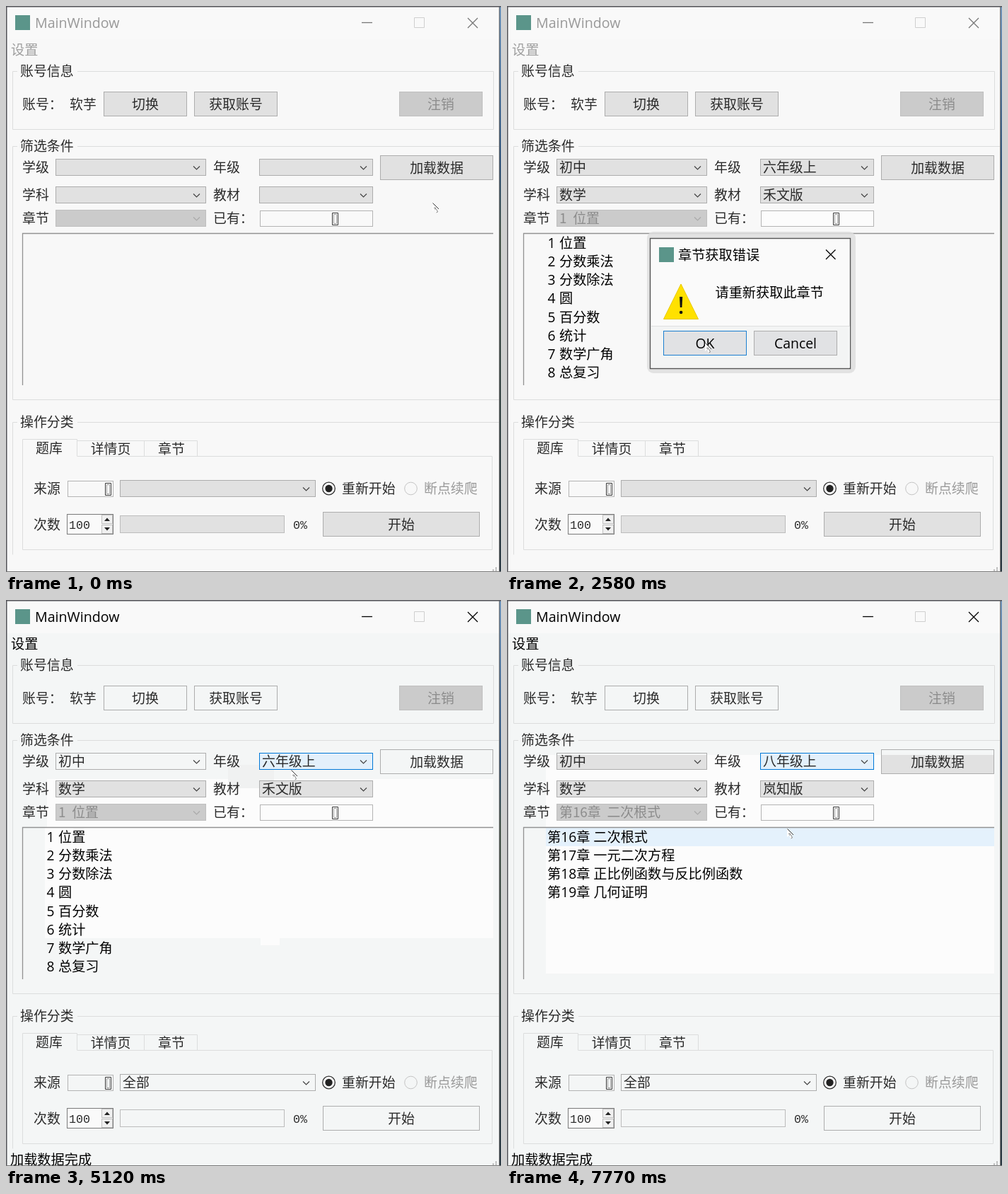
An HTML page for the animation above (8000 ms loop, 700 by 800 pixels).

```html
<!DOCTYPE html>
<html lang="zh-CN">
<head>
<meta charset="utf-8">
<style>
  html, body { margin: 0; width: 100%; height: 100%; overflow: hidden; background: #f8f8f8; }
  svg { display: block; width: 700px; height: 800px; }
  text { white-space: pre; }
  .form { font: 300 18.9px "Noto Sans CJK SC Light", "Noto Sans CJK SC", "Noto Sans CJK", sans-serif; word-spacing: 4.5px; }
  .ui { font: 400 19.2px "Open Sans", "Noto Sans CJK SC", "Noto Sans CJK", sans-serif; }
  .mono { font: 400 16.6px "Liberation Mono", monospace; }
</style>
</head>
<body>
<svg id="stage" viewBox="0 0 700 800"></svg>
<script>
const LOOP = 8000;
const INK = '#2a2a2a';
const GREY = '#e1e1e1';
const FRESH = '#fcfcfc';
const GRADES = ['六', '七', '八', '九'].flatMap(n => [n + '年级上', n + '年级下']);
const UNITS = ['位置', '分数乘法', '分数除法', '圆', '百分数', '统计', '数学广角', '总复习'];
const CHAPTERS = ['第16章 二次根式', '第17章 一元二次方程', '第18章 正比例函数与反比例函数', '第19章 几何证明'];

// Each entry patches the state from its time on.
const timeline = [
  [0, { cursor: [603, 278], active: false, menu: false, load: 'normal', data: 0, dialog: 0, tone: 0,
        ok: 'focus', cancel: 'normal', grade: 'normal', popup: 0, pick: 0, done: false, refresh: 0, hoverRow: -1 }],
  [270, { cursor: [603, 270] }],
  [440, { cursor: [602, 252] }],
  [565, { cursor: [601, 239], load: 'hover' }],
  [690, { cursor: [600, 230] }],
  [1000, { active: true }],
  [1150, { menu: true }],
  [1350, { cursor: [600, 228] }],
  [2330, { active: false, menu: false, data: 1, load: 'normal', dialog: 0.4 }],
  [2455, { cursor: [280, 476], dialog: 0.85 }],
  [2580, { dialog: 1 }],
  [2720, { ok: 'hover' }],
  [3120, { cursor: [300, 476] }],
  [3270, { cursor: [357, 476], ok: 'focus' }],
  [3420, { cursor: [368, 474], cancel: 'hover' }],
  [3540, { cursor: [375, 472] }],
  [3660, { cursor: [378, 471] }],
  [3930, { dialog: 0.5, tone: 1, active: true }],
  [4050, { dialog: 0.2 }],
  [4170, { dialog: 0, cursor: [378, 474] }],
  [4350, { menu: true, done: true }],
  [4470, { cursor: [361, 464], hoverRow: 5, refresh: 1 }],
  [4700, { cursor: [316, 253], hoverRow: -1, refresh: 2 }],
  [4840, { cursor: [370, 234], refresh: 3 }],
  [4990, { cursor: [394, 237], grade: 'hover' }],
  [5120, { cursor: [403, 240] }],
  [5670, { popup: 51 }],
  [5820, { popup: 154, grade: 'down' }],
  [6100, { cursor: [403, 241] }],
  [6250, { cursor: [402, 276], pick: 1 }],
  [6400, { cursor: [400, 304], pick: 3 }],
  [6550, { cursor: [398, 312] }],
  [6670, { cursor: [397, 318], pick: 4 }],
  [6790, { cursor: [396, 323] }],
  [7350, { popup: 0 }],
  [7630, { data: 2, refresh: 4, hoverRow: 0 }],
  [7770, { grade: 'hover' }]
];

const SKIN = {
  hover: ['#e3f0fb', '#0078d7'],
  down: ['#cce4f7', '#0a64ad'],
  off: ['#cbcbcb', '#bfbfbf']
};

const rect = (x, y, x2, y2, fill, stroke, extra = '') => {
  const o = stroke ? 0.5 : 0;
  return `<rect x="${x + o}" y="${y + o}" width="${x2 - x - 2 * o}" height="${y2 - y - 2 * o}" fill="${fill}" stroke="${stroke || 'none'}" ${extra}/>`;
};
const path = (d, stroke, width = 1, fill = 'none') =>
  `<path d="${d}" fill="${fill}" stroke="${stroke}" stroke-width="${width}"/>`;
const text = (x, mid, str, { cls = 'form', fill = INK, anchor = 'start', size } = {}) =>
  `<text class="${cls}" x="${x}" y="${mid + 7}" fill="${fill}" text-anchor="${anchor}"${size ? ` style="font-size:${size}px"` : ''}>${str}</text>`;
const skin = (state, fill) => SKIN[state] || [fill, '#adadad'];

function button(x, y, x2, y2, label, state, fill) {
  return rect(x, y, x2, y2, ...skin(state, fill)) +
    text((x + x2) / 2, (y + y2) / 2, label, { anchor: 'middle', fill: state === 'off' ? '#8c8c8c' : INK });
}

function combo(x, y, x2, label, state, fill) {
  const off = state === 'off';
  return rect(x, y, x2, y + 24, ...skin(state, fill)) +
    path(`M${x2 - 18} ${y + 10.5}l4.5 4.5 4.5 -4.5`, off ? '#aaa' : '#444', 1.2) +
    text(x + 4, y + 12, label, { fill: off ? '#8c8c8c' : INK });
}

// A zero built of outlined segments.
function lcd(x, y, x2, digitX, fill) {
  const top = y + 3.5;
  return rect(x, y, x2, y + 23, fill, '#b4b4b4') +
    path(`M${digitX + .5} ${top}h8v17h-8z`, '#3a3a3a') +
    path(`M${digitX + 2.5} ${top + 2}h4v13h-4z`, '#8a8a8a', .8);
}

function group(title, x2, y, y2, line) {
  return path(`M16 ${y + .5}H9.5V${y2 + .5}` + (title === '操作分类' ? '' : `H${x2}`) +
    (x2 < 695 ? `V${y + .5}` : `M${x2} ${y + .5}`) + 'H101', line) +
    text(20, y, title);
}

function titleBar(s) {
  const ink = s.active ? '#000' : '#999';
  const mark = s.active ? '#000' : '#777';
  return rect(2, 2, 698, 47, '#f9f9f9') +
    rect(13, 13, 34, 34, '#5b958a') +
    text(41, 24, 'MainWindow', { cls: 'ui', fill: ink, size: 19.6 }) +
    path('M503 23.5h15', mark, 1.3) +
    path('M577.5 16.5h14v14h-14z', '#cfcfcf') +
    path('M653 17l14 14m0 -14l-14 14', mark, 1.3) +
    text(7, 62, '设置', { cls: 'ui', fill: s.menu ? '#000' : '#a0a0a0' });
}

function filters(s, bg, fill) {
  const lower = s.refresh > 1 ? GREY : fill;
  const upper = s.refresh > 3 ? GREY : fill;
  const pick = ['', GRADES[0], GRADES[4]][s.data];
  const edition = ['', '禾文版', '岚知版'][s.data];
  const chapter = ['', '1 位置', CHAPTERS[0]][s.data];
  const labels = [['学级', '年级', 228], ['学科', '教材', 267], ['章节', '已有：', 300]];
  let out = labels.map(([a, b, y]) => text(23, y, a) + text(293, y, b)).join('');
  out += combo(70, 216, 283, s.data ? '初中' : '', 'normal', upper) +
    combo(358, 216, 519, pick, s.grade, upper) +
    button(529, 211, 689, 246, '加载数据', s.load, upper);
  if (s.refresh > 3) out += rect(71, 217, 282, 219, bg) + rect(530, 212, 688, 219, bg);
  return out +
    combo(70, 255, 283, s.data ? '数学' : '', 'normal', lower) +
    combo(358, 255, 519, edition, 'normal', lower) +
    combo(70, 288, 283, chapter, 'off') +
    lcd(359, 289, 519, 461, s.data ? FRESH : '#f9f9f9');
}

// Areas repainted in a lighter tone as the window updates.
function refreshed(s) {
  if (s.refresh > 3) return rect(55, 219, 689, 528, FRESH);
  if (!s.refresh) return '';
  return rect(55, 321, 689, 478, FRESH) + rect(360, 478, 387, 488, FRESH) +
    (s.refresh > 1 ? rect(58, 253, 689, 321, FRESH) : '') +
    (s.refresh > 2 ? rect(314, 233, 379, 266, '#f0f1f1') : '');
}

function list(s) {
  const rowY = i => 335 + i * 26.15;
  const ui = { cls: 'ui', fill: '#000' };
  let out = '';
  if (s.hoverRow >= 0) out += rect(55, rowY(s.hoverRow) - 13.5, 689, rowY(s.hoverRow) + 13, '#e4f1fc');
  out += path('M689 321.5H23.5V536', '#929292', 1.3);
  if (s.data === 1) out += UNITS.map((u, i) => text(57.5, rowY(i), i + 1, ui) + text(74, rowY(i), u, ui)).join('');
  if (s.data === 2) out += CHAPTERS.map((c, i) => text(57, rowY(i), c, ui)).join('');
  return out;
}

function operations(s, bg, fill, line) {
  const mid = { anchor: 'middle' };
  return group('操作分类', 697, 588, 775, line) +
    path('M101 636.5H687.5V768.5H23.5V612.5H100.5V636.5M101 614.5H270.5V636M195.5 614V636', line) +
    text(61, 625, '题库', mid) + text(148, 626, '详情页', mid) + text(234, 626, '章节', mid) +
    text(39, 682, '来源') + lcd(87, 671, 152, 140, bg) +
    combo(161, 670, 438, s.done ? '全部' : '', 'normal', fill) +
    '<circle cx="456.5" cy="682" r="8.8" fill="#fafafa" stroke="#333" stroke-width="1.3"/><circle cx="456.5" cy="682" r="5.2" fill="#222"/>' +
    text(475, 682, '重新开始') +
    '<circle cx="572.5" cy="682" r="8.8" fill="none" stroke="#c4c4c4"/>' +
    text(591, 682, '断点续爬', { fill: '#999' }) +
    text(39, 733, '次数') +
    rect(86, 718, 152, 747, '#fafafa', '#7a7a7a') +
    rect(135, 719, 151, 732, '#f0f0f0', '#c0c0c0') + rect(135, 733, 151, 746, '#f0f0f0', '#c0c0c0') +
    path('M139 728l4 -4.5 4 4.5zM139 737l4 4.5 4 -4.5z', 'none', 0, '#222') +
    text(89, 731.5, '100', { cls: 'mono' }) +
    rect(161, 720, 394, 745, fill, '#bcbcbc') +
    text(406, 731.5, '0%', { cls: 'mono' }) +
    button(448, 715, 670, 750, '开始', 'normal', fill);
}

function dialog(s) {
  if (!s.dialog) return '';
  const zoom = 0.9 + 0.1 * s.dialog;
  const ui = { cls: 'ui', fill: '#000' };
  const mid = { ...ui, anchor: 'middle', size: 19.4 };
  const okBox = s.ok === 'hover' ? ['#e5f1fb', '#0078d7'] : ['#e1e2e4', '#1b7fd0'];
  return `<g opacity="${s.dialog}" transform="translate(344 420) scale(${zoom}) translate(-344 -420)">` +
    rect(198, 319, 493, 519, '#dedede', '', 'rx="9" opacity=".85"') +
    rect(202, 328, 486, 513, '#fafafa', '#555', 'stroke-width="1.4"') +
    rect(204, 452, 485, 511, '#f3f4f4') + path('M204 452.5H485', '#dfdfdf') +
    rect(215, 341, 236, 362, '#5b958a') +
    text(242, 352, '章节获取错误', ui) +
    path('M451 344.5l13.5 13.5m0 -13.5l-13.5 13.5', '#000', 1.3) +
    path('M246 393L270.5 442.5H221.5z', '#e9c800', 1, '#ffe100') +
    path('M244 411h4.2l-.8 15h-2.6z', 'none', 0, '#111') + '<circle cx="246.1" cy="433" r="2.3" fill="#111"/>' +
    text(294.5, 405, '请重新获取此章节', ui) +
    rect(221, 459, 339, 494, ...okBox, s.cancel === 'hover' ? 'stroke-width="1.7"' : '') +
    text(280, 476.5, 'OK', mid) +
    rect(349, 459, 467, 494, ...skin(s.cancel, '#e1e2e4')) +
    text(408, 476.5, 'Cancel', mid) + '</g>';
}

function popup(s) {
  if (!s.popup) return '';
  const end = 240 + s.popup;
  const step = 19.2;
  const top = Math.round(240 + s.pick * step);
  return '<clipPath id="drop">' + rect(358, 239, 523, end + 2, '#000') + '</clipPath><g clip-path="url(#drop)">' +
    rect(361, 242, 522, end + 2, '#aaa', '', 'opacity=".7"') +
    rect(358, 239, 520, end, '#fff', '#858585') +
    rect(359, top, 519, top + 19, '#0078d7', '#ff8728', 'stroke-dasharray="1 1"') +
    GRADES.map((g, i) => text(362, 249.5 + i * step, g, { fill: i === s.pick ? '#fff' : INK })).join('') + '</g>';
}

const cursor = ([x, y]) => `<g transform="translate(${x} ${y})">` +
  path('M0 0V12L3 9.5 5 14.5 7.5 13.5 5.5 9H9z', 'none', 0, '#fff') +
  path('M.5 .5L9 9', '#333') + path('M2 7.5h3l-1.5 2.5M5.5 9l2 4 -2 1', '#777', .9) + '</g>';

function scene(s) {
  const bg = ['#f8f8f8', '#f4f6f6'][s.tone];
  const fill = s.tone ? bg : GREY;
  const line = '#dcdddd';
  return rect(0, 0, 700, 800, bg) + titleBar(s) + refreshed(s) +
    group('账号信息', 689.5, 92, 174, line) +
    text(23, 139, '账号：') + text(90, 139, '软芋') +
    button(138, 121, 256, 156, '切换', 'normal', fill) +
    button(266, 121, 384, 156, '获取账号', 'normal', fill) +
    button(556, 121, 674, 156, '注销', 'off') +
    group('筛选条件', 697, 198, 556, line) +
    filters(s, bg, fill) + list(s) + operations(s, bg, fill, line) +
    (s.done ? text(6, 790.5, '加载数据完成', { cls: 'ui', fill: '#000' }) : '') +
    path('M688 797.5h2m2 0h2M692 794.5h2', '#aaa', 2) +
    '<linearGradient id="desk" x2="0" y2="1"><stop stop-color="#6f93b8"/><stop offset=".28" stop-color="#36567a"/><stop offset=".4" stop-color="#4d5a50"/><stop offset="1" stop-color="#2c3a44"/></linearGradient>' +
    '<rect x="698" width="2" height="800" fill="url(#desk)"/>' +
    rect(697, 0, 698, 800, '#777') + rect(0, 0, 700, 1.6, '#5b5b60') +
    rect(0, 0, 1.5, 800, '#55555a') + rect(0, 799, 700, 800, '#777') +
    dialog(s) + popup(s) + cursor(s.cursor);
}

const stage = document.getElementById('stage');
let shown = 0;
function tick() {
  const t = performance.now() % LOOP;
  const past = timeline.filter(([at]) => at <= t);
  if (past.length !== shown) {
    shown = past.length;
    stage.innerHTML = scene(Object.assign({}, ...past.map(([, patch]) => patch)));
  }
  requestAnimationFrame(tick);
}
tick();
</script>
</body>
</html>
```
